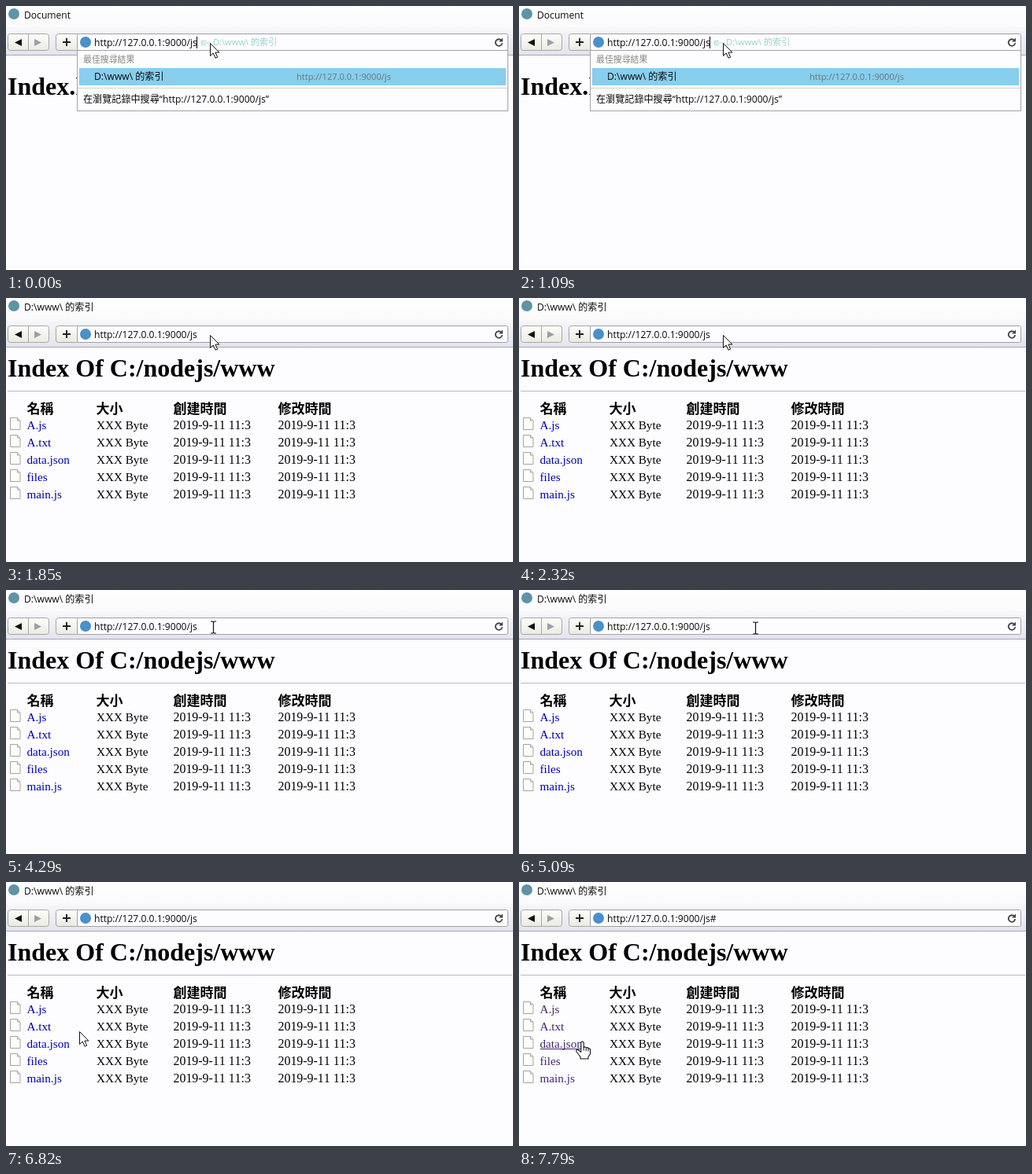
Recreate the animation shown at these times as an HTML page. Size 644 by 336 pixels, loop 8000 ms.

```html
<!DOCTYPE html>
<html lang="zh-Hant">
<head>
<meta charset="utf-8">
<title>Document</title>
<style>
html, body { margin: 0; width: 100%; height: 100%; overflow: hidden; background: #fdfdff; }
svg { display: block; width: 644px; height: 336px; }
text { white-space: pre; font-kerning: none; }
.ui { font: 12.1px "Open Sans", "Noto Sans CJK TC", "Noto Sans CJK", sans-serif; fill: #0a0a0a; }
.small { font-size: 11.1px; }
.page { font-family: "Liberation Serif", "Noto Sans CJK TC", "Noto Sans CJK", serif; fill: #000; }
.h1 { font-size: 32px; font-weight: bold; }
.th { font-size: 17px; font-weight: bold; }
.td { font-size: 15.2px; }
.date { font-size: 15.9px; }
</style>
</head>
<body>
<svg id="stage" viewBox="0 0 644 336" xmlns="http://www.w3.org/2000/svg">
  <defs>
    <linearGradient id="chrome" x1="0" y1="0" x2="0" y2="1">
      <stop offset="0" stop-color="#fefefe"/>
      <stop offset=".42" stop-color="#fbfbfd"/>
      <stop offset=".55" stop-color="#f3f3f8"/>
      <stop offset="1" stop-color="#e4e4ee"/>
    </linearGradient>
    <linearGradient id="button" x1="0" y1="0" x2="0" y2="1">
      <stop offset="0" stop-color="#fefefa"/>
      <stop offset="1" stop-color="#eaeae2"/>
    </linearGradient>
  </defs>
  <rect width="644" height="336" fill="#fdfdff"/>

  <g id="home" class="page"><text class="h1" x="2" y="113">Index.html</text></g>

  <g id="listing" class="page">
    <text class="h1" x="2" y="100">Index Of C:/nodejs/www</text>
    <path d="M2 118.5H643" stroke="#b9b9cc"/>
    <g id="table"></g>
    <path id="underline" d="M27 212.5H82"/>
  </g>

  <rect width="644" height="62" fill="url(#chrome)"/>
  <path d="M0 62.5H644" stroke="#a6a6b8"/>
  <circle cx="10" cy="10" r="7" fill="#5f93a8"/>
  <text id="title" class="ui" x="23" y="16"></text>

  <g fill="url(#button)" stroke="#a6a6a6">
    <rect x="2.5" y="35.5" width="52" height="21" rx="3"/>
    <rect x="63.5" y="35.5" width="30" height="21" rx="3"/>
    <path d="M28.5 36V56"/>
  </g>
  <path d="M11 46.5L20 42V51Z" fill="#111"/>
  <path d="M45 46.5L36 42V51Z" fill="#9d9da8"/>
  <path d="M72 46H82M77 41V51" stroke="#222" stroke-width="2"/>

  <rect x="90.5" y="35.5" width="547" height="21" rx="2" fill="#fdfdff" stroke="#a0a0a6"/>
  <circle cx="101" cy="46" r="7" fill="#4a90cc"/>
  <text id="url" class="ui" x="112" y="50.5"></text>
  <path d="M629.2 43.6A4.3 4.3 0 1 0 630.3 47.2" fill="none" stroke="#444" stroke-width="1.8"/>
  <path d="M631 40.4V45.4H626Z" fill="#444"/>

  <g id="popup" class="ui">
    <path d="M242.5 39V54" stroke="#000"/>
    <path d="M254 44.5H248.5V49.5H254M249 47H259" fill="none" stroke="#a5d6d3"/>
    <text class="small" x="263" y="50" fill="#9bcfcc">D:\www\ 的索引</text>
    <rect x="90.5" y="56.5" width="547" height="77" fill="#fdfdff" stroke="#a3a3a6"/>
    <text x="98" y="72" style="font-size:10.9px" fill="#858580">最佳搜尋結果</text>
    <rect x="93" y="79" width="542" height="22" fill="#88ceee"/>
    <text x="112" y="94">D:\www\ 的索引</text>
    <text class="small" x="369" y="94" fill="#64757a">http://127.0.0.1:9000/js</text>
    <path d="M91 104.5H637" stroke="#d0d0d4"/>
    <text x="98" y="123">在瀏覽記錄中搜尋“http://127.0.0.1:9000/js”</text>
  </g>

  <g id="arrow">
    <path d="M0 0V16L3.7 12.5L6.5 18.7L9.2 17.6L6.4 11.6H11.4Z" fill="#fff" stroke="#111" stroke-linejoin="round"/>
  </g>
  <g id="beam">
    <path d="M-3.5 -7.5H-1L0 -6.5L1 -7.5H3.5M0 -7V7M-3.5 7.5H-1L0 6.5L1 7.5H3.5" fill="none" stroke="#111" stroke-width="1.2"/>
  </g>
  <g id="hand">
    <path d="M-1.7 0.5Q0 -1.6 1.7 .5V7Q3.5 5.6 4.7 7.5Q6.6 6.4 7.5 8.3Q9.8 7.7 10 10V15L7.5 19V21.5H-2.5V19L-7.5 12.5Q-8.6 10 -6 9.8L-1.7 13Z"
      fill="#fff" stroke="#111" stroke-width="1.1" stroke-linejoin="round"/>
    <path d="M1.7 7V11M4.7 7.7V11.5M7.5 8.5V12" stroke="#111"/>
  </g>
</svg>
<script>
const LOOP = 8000, PAGE = 1770, TITLE = 1810, BEAM = 4290, CLICK = 7450;
const LINK = "#0000b4", VISITED = "#43286e";
const $ = id => document.getElementById(id);

// Pointer hot spot: time, x, y
const track = [
  [0, 259, 47], [4289, 259, 47],
  [4290, 263, 47], [4420, 281, 48],
  [4590, 281, 48], [5090, 300, 48],
  [5640, 300, 48], [5810, 252, 49],
  [5980, 252, 49], [6060, 238, 51],
  [6480, 238, 51], [6820, 93, 190],
  [7120, 80, 203]
];

function buildTable() {
  const cols = [27, 115, 213, 346];
  const cell = (cls, x, y, s) => `<text class="${cls}" x="${x}" y="${y}">${s}</text>`;
  const date = "2019-9-11 11:3";
  let out = ["名稱", "大小", "創建時間", "修改時間"]
    .map((s, i) => cell("th", cols[i] - .5, 147, s)).join("");
  ["A.js", "A.txt", "data.json", "files", "main.js"].forEach((name, i) => {
    const y = 167 + 22 * i;
    out += `<g transform="translate(5 ${y - 15})" fill="#fdfdfa" stroke="#a4a4a0">
      <path d="M.5 .5H9.5L13 4V15.5H.5Z"/><path d="M9.5 .5V4H13" fill="#e6e6e2"/></g>`;
    out += cell("td name", 26.5, y, name) + cell("td", cols[1], y, "XXX Byte")
      + cell("date", cols[2] - .5, y, date) + cell("date", cols[3] - .5, y, date);
  });
  $("table").innerHTML = out;
}

function pointer(t) {
  const i = track.findIndex(k => k[0] > t);
  if (i < 0) return track[track.length - 1].slice(1);
  const [t0, x0, y0] = track[i - 1], [t1, x1, y1] = track[i];
  const p = (t - t0) / (t1 - t0);
  const e = 1 - (1 - p) ** 1.4;
  return [x0 + (x1 - x0) * e, y0 + (y1 - y0) * e];
}

const show = (id, on) => $(id).setAttribute("visibility", on ? "visible" : "hidden");

function update(t) {
  const loaded = t >= PAGE, clicked = t >= CLICK;
  const color = clicked ? VISITED : LINK;
  show("home", !loaded);
  show("listing", loaded);
  show("popup", t < PAGE - 40);
  $("title").textContent = t < TITLE ? "Document" : "D:\\www\\ 的索引";
  $("url").textContent = "http://127.0.0.1:9000/js" + (clicked ? "#" : "");
  for (const n of names) n.style.fill = color;

  const [x, y] = pointer(t);
  const kind = t < BEAM ? "arrow" : y < 57 ? "beam" : x < 83 && y > 196 ? "hand" : "arrow";
  for (const id of ["arrow", "beam", "hand"]) show(id, id === kind);
  $(kind).setAttribute("transform", `translate(${Math.round(x) + .5} ${Math.round(y) + .5})`);
  show("underline", kind === "hand");
  $("underline").setAttribute("stroke", color);
}

buildTable();
const names = document.querySelectorAll(".name");
const start = performance.now();
function frame() {
  update((performance.now() - start) % LOOP);
  requestAnimationFrame(frame);
}
frame();
</script>
</body>
</html>
```
